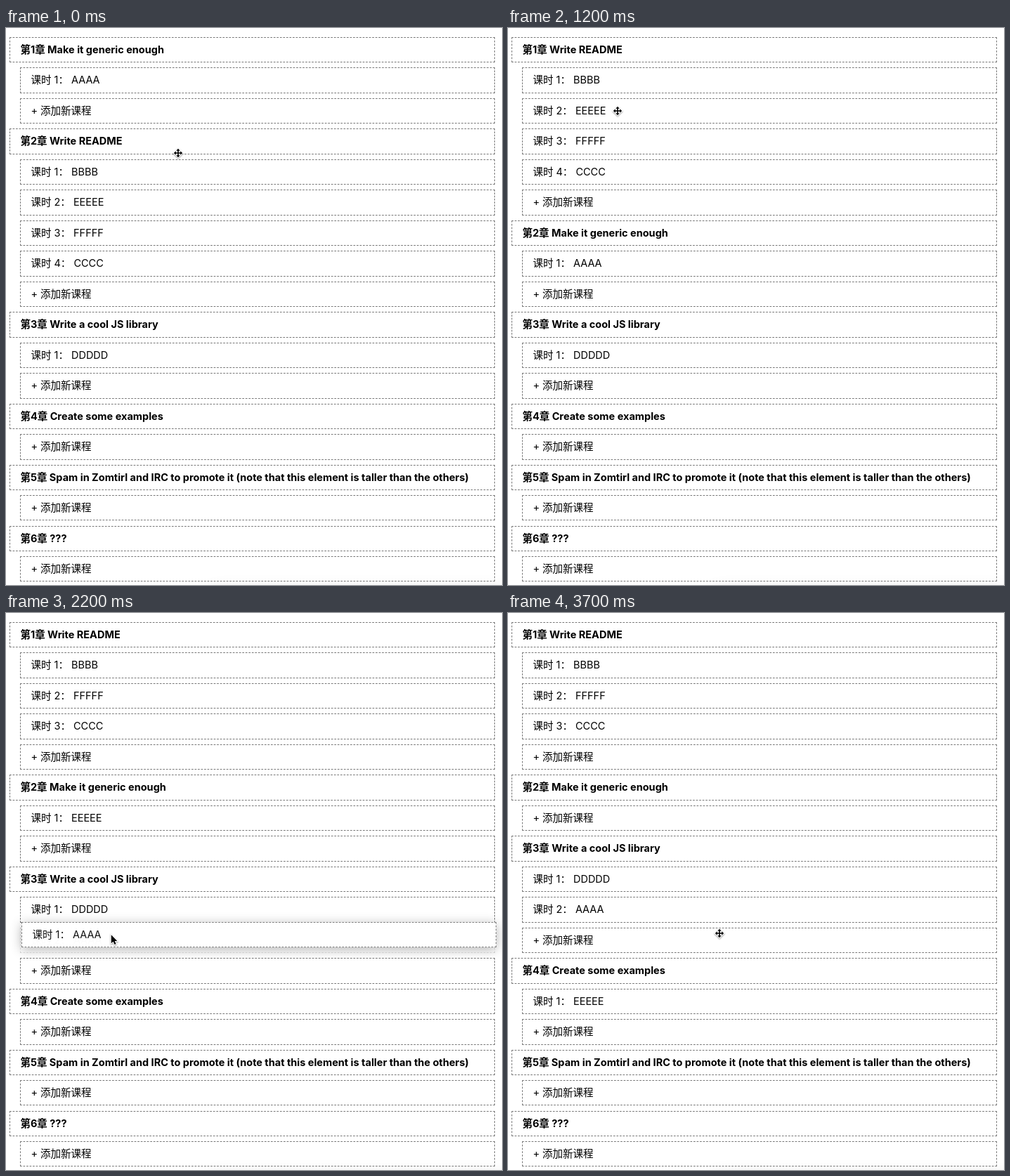
Recreate the animation shown at these times as an HTML page with a canvas. Size 706 px wide and 793 px high, loop 4000 ms.

```html
<!DOCTYPE html>
<html lang="zh-CN">
<head>
<meta charset="utf-8">
<title>Sortable course outline</title>
<style>
  html, body { margin: 0; width: 100%; height: 100%; overflow: hidden; background: #fff; }
  canvas { display: block; }
</style>
</head>
<body>
<canvas id="stage" width="706" height="793"></canvas>
<script>
const ctx = document.getElementById('stage').getContext('2d');
const LOOP = 4000, STEP = 100, PITCH = 43.47, RIGHT = 696;
const FONT = '14.5px Inter, "Noto Sans CJK SC", "Noto Sans CJK", sans-serif';

const chapters = {
  M: 'Make it generic enough',
  W: 'Write README',
  J: 'Write a cool JS library',
  X: 'Create some examples',
  S: 'Spam in Zomtirl and IRC to promote it (note that this element is taller than the others)',
  Q: '???'
};
const lessons = { A: 'AAAA', B: 'BBBB', C: 'CCCC', D: 'DDDDD', E: 'EEEEE', F: 'FFFFF' };

// One word per chapter: its key, then its lessons.
const startLayout = ['MA', 'WBEFC', 'JD', 'X', 'S', 'Q'];

// Pointer moves; those with a key drag that item into a chapter slot.
const home = [245, 178];
const legs = [
  { begin: 0, end: 100, to: [233, 162] },
  { begin: 200, end: 600, to: [234, 49], key: 'W', target: 0 },
  { begin: 700, end: 1100, to: [156, 118] },
  { begin: 1200, end: 1500, to: [168, 354], key: 'E', target: 1 },
  { begin: 1700, end: 2000, to: [148, 292] },
  { begin: 2000, end: 2300, to: [150, 479], key: 'A', target: 2 },
  { begin: 2400, end: 2700, to: [128, 295] },
  { begin: 2800, end: 3100, to: [144, 600], key: 'E', target: 3, via: 2 },
  { begin: 3400, end: 3700, to: [301, 456] }
];
const PREVIEW_DISTANCE = 100;

const easeOut = u => 1 - (1 - u) ** 2;

function place(layout, key, slot) {
  const word = layout.find(w => w[0] === key);
  if (word) {
    const rest = layout.filter(w => w !== word);
    rest.splice(slot, 0, word);
    return rest;
  }
  return layout.map((w, i) => w.replace(key, '') + (i === slot ? key : ''));
}

function stateAt(t) {
  let layout = startLayout, cursor = home, drag = null;
  for (const { begin, end, to, key, target, via = target } of legs) {
    if (t < begin) break;
    const grab = cursor, progress = Math.min(1, (t - begin) / (end - begin));
    cursor = grab.map((v, i) => v + (to[i] - v) * easeOut(progress));
    if (!key || t === begin) continue;
    if (t > end + STEP) {
      layout = place(layout, key, target);
      continue;
    }
    drag = { key, from: layout, grab, held: t <= end };
    if (progress === 1 && via !== target) drag.dropChapter = target;
    if (Math.abs(cursor[1] - grab[1]) > PREVIEW_DISTANCE) layout = place(layout, key, via);
    break;
  }
  return { layout, cursor, drag };
}

function rowsOf(layout, dragKey) {
  const rows = [];
  layout.forEach(([key, ...items], chapter) => {
    const whole = key === dragKey;
    const add = (text, x, dragged) => {
      const y = 13 + PITCH * rows.length;
      rows.push({ text, x, chapter, dragged, bold: x === 5,
        top: Math.round(y), bottom: Math.round(y + 35.4) });
    };
    add(`第${chapter + 1}章 ${chapters[key]}`, 5, whole);
    items.forEach((item, n) => add(`课时 ${n + 1}： ${lessons[item]}`, 20, whole || item === dragKey));
    add('+ 添加新课程', 20, whole);
  });
  return rows;
}

// Dashes are spaced so that a line starts and ends with a full dash.
function dashedLine(x0, y0, x1, y1, weight) {
  const length = x1 - x0 + y1 - y0, dash = 3 * weight, gap = 2 * weight;
  const count = Math.round((length + gap) / (dash + gap));
  ctx.setLineDash([dash, (length - count * dash) / (count - 1)]);
  ctx.beginPath();
  ctx.moveTo(x0, y0);
  ctx.lineTo(x1, y1);
  ctx.stroke();
}

function drawRow({ text, x, top, bottom, bold }) {
  const weight = .906;
  ctx.strokeStyle = '#777';
  ctx.lineWidth = 1;
  for (const y of [top + .5, bottom + .5]) dashedLine(x, y, RIGHT, y, weight);
  for (const side of [x + .5, RIGHT - .5]) dashedLine(side, top, side, bottom + 1, weight);
  ctx.fillStyle = '#000';
  ctx.font = (bold ? '700 ' : '400 ') + FONT;
  ctx.fillText(text, x + 15.4, top + 23);
}

function setShadow(color, blur, offset) {
  ctx.shadowColor = color;
  ctx.shadowBlur = blur;
  ctx.shadowOffsetY = offset;
}

function drawGhost({ key, from, grab }, [x, y]) {
  const rows = rowsOf(from, key).filter(row => row.dragged);
  const boxes = new Path2D(), outside = new Path2D();
  rows.forEach(r => boxes.rect(r.x, r.top, RIGHT - r.x, r.bottom - r.top + 1));
  outside.rect(-999, -999, 2999, 2999);
  outside.addPath(boxes);
  ctx.save();
  ctx.translate(Math.round(x - grab[0]), Math.round(y - grab[1]));
  ctx.fillStyle = '#fff';

  ctx.save();
  ctx.clip(outside, 'evenodd');
  setShadow('rgba(0,0,0,.3)', 16, 3);
  ctx.fill(boxes);
  ctx.restore();

  ctx.globalAlpha = .93;
  ctx.fill(boxes);
  rows.forEach(drawRow);
  ctx.restore();
}

const pointer = new Path2D('M0 0V12L2.8 9.5L4.8 13.8L6.8 12.9L4.9 8.7H8.5Z');
const mover = new Path2D();
for (let i = 0; i < 4; i++) {
  mover.addPath(new Path2D('M0 -6.2L2.7 -3.2H.8V0H-.8V-3.2H-2.7Z'), new DOMMatrix().rotate(90 * i));
}

function drawCursor([x, y], shape) {
  ctx.save();
  ctx.translate(x, y);
  ctx.setLineDash([]);
  ctx.strokeStyle = '#fff';
  ctx.fillStyle = '#000';
  ctx.lineWidth = 2;
  setShadow('rgba(0,0,0,.4)', 2, 1);
  ctx.stroke(shape);
  setShadow('transparent', 0, 0);
  ctx.fill(shape);
  ctx.restore();
}

function drawBottomShade() {
  ctx.save();
  setShadow('rgba(0,0,0,.06)', 20, 0);
  ctx.fillStyle = '#fff';
  ctx.fillRect(292, 794, 500, 60);
  ctx.restore();
}

function drawDropLine(top) {
  ctx.strokeStyle = '#2fb9c9';
  ctx.lineWidth = 2;
  dashedLine(20, top - 4, RIGHT, top - 4, 1.81);
}

function draw(t) {
  const { layout, cursor, drag } = stateAt(t);
  const rows = rowsOf(layout, drag?.key);
  ctx.fillStyle = '#fff';
  ctx.fillRect(0, 0, 706, 793);
  drawBottomShade();
  for (const row of rows) {
    ctx.globalAlpha = row.dragged ? .22 : 1;
    drawRow(row);
  }
  ctx.globalAlpha = 1;
  if (drag?.dropChapter) drawDropLine(rows.findLast(r => r.chapter === drag.dropChapter).top);
  if (drag?.held) drawGhost(drag, cursor);
  drawCursor(cursor, drag?.held ? pointer : mover);
}

function frame() {
  const t = performance.now() % LOOP;
  draw(Math.floor(t / STEP) * STEP);
  requestAnimationFrame(frame);
}
frame();
</script>
</body>
</html>
```
